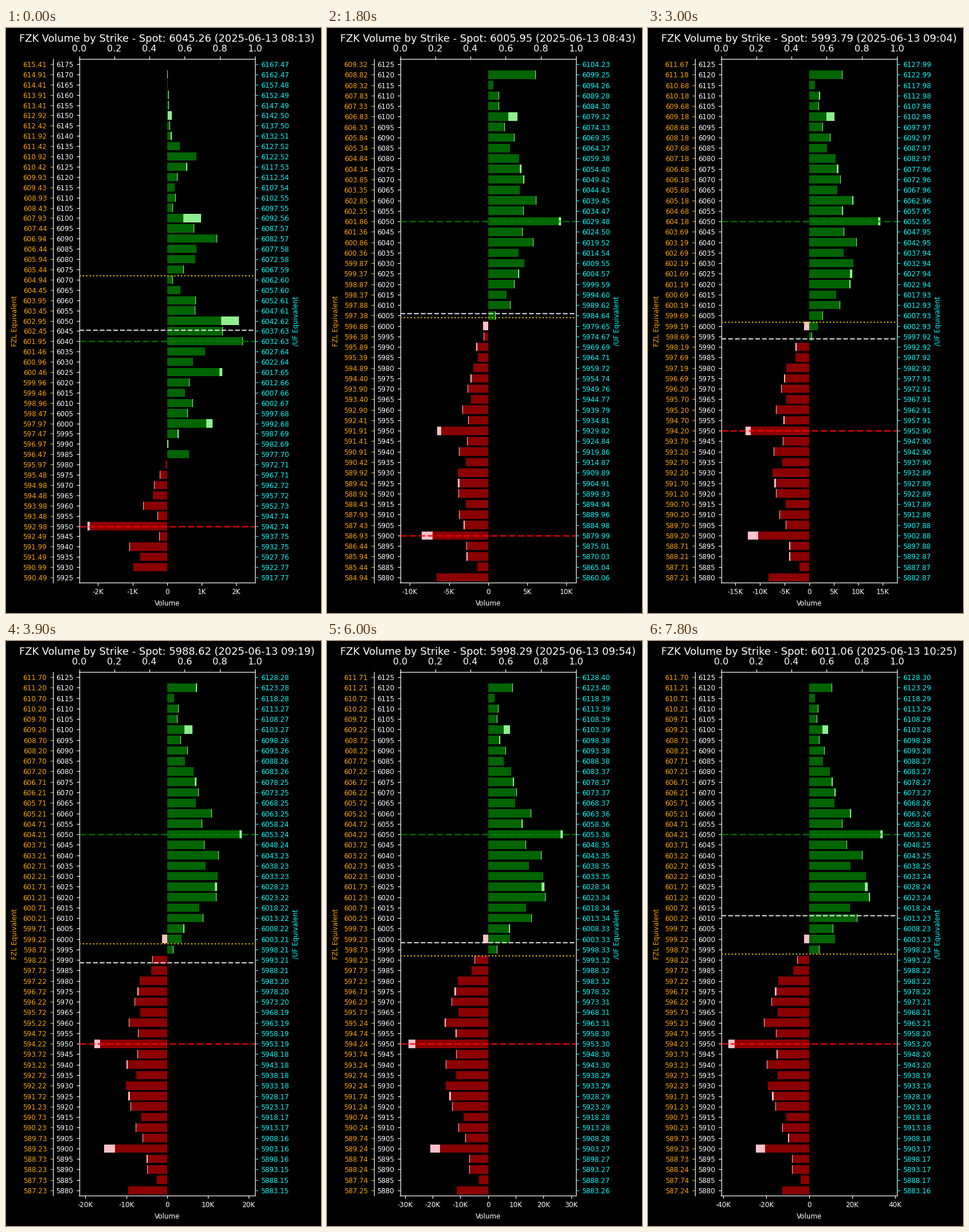
Animation of 549x1020 px, one loop 8 s. Source, as a matplotlib script:

```python
import numpy as np
import matplotlib.pyplot as plt
from matplotlib.animation import FuncAnimation
from matplotlib.ticker import FuncFormatter, MaxNLocator

W, H, DPI = 549, 1020, 96
LEFT, RIGHT, TOP, BOTTOM = 127.5, 434, 54, 967
FRAMES, INTERVAL, HOLD = 80, 100, 3
SMALL, MEDIUM, LARGE = 8.9, 12, 13.37
THICK, THIN = 2.225, 1.669

# Market state at a few steps; everything between is interpolated
STEPS = [0, 3, 6, 10, 16, 20, 26]
TOP_STRIKE = np.array([6175, 6175, 6125, 6125, 6125, 6125, 6125])
FUND_RATE = np.array([615.408, 611.84, 609.3173, 611.6745,
                      611.7229, 611.714, 611.7045]) / TOP_STRIKE
FUTURE_RATE = np.array([6167.468, 6129.98, 6104.2305, 6127.988,
                        6128.573, 6128.399, 6128.296]) / TOP_STRIKE
FLIP = [6071.8, 5994, 6004, 6001.95, 5993.3, 5992, 5992.8]
REACH = [2545, 2615, 11230, 17890, 25190, 31760, 40850]
SPOT_STEPS = [0, 3, 4, 6, 10, 16, 20, 26]
SPOT = [6045.26, 6045.26, 6003.4, 6005.95, 5993.79, 5983.45, 5998.29, 6011.06]
OPEN_STEP = 4
MONEY = 6000

EARLY = np.arange(6175, 5924, -5)
LATE = np.arange(6125, 5879, -5)

# Volume envelopes by strike, puts negative
PREMARKET = {
    5925: 0, 5930: -.97, 5940: -1.1, 5945: -.3, 5950: -1.25, 5955: -.38,
    5960: -.7, 5980: -.05, 5985: .85, 5990: .03, 6000: .85, 6020: .65,
    6025: 1.6, 6030: .75, 6040: 2.2, 6045: 2.15, 6050: 1.34, 6060: .84,
    6070: .17, 6090: 1.45, 6105: .23, 6120: .31, 6130: .85, 6140: .13, 6175: 0}
KNOTS = [5880, 5885, 5900, 5910, 5930, 5960, 5980, 5990, 5995, 6000,
         6010, 6020, 6040, 6060, 6070, 6090, 6115, 6120, 6125]
OPENING = [-6.6, -1.8, -4.6, -3.7, -3.9, -3.3, -1.9, -1.5, -.8, -.3,
           2.9, 3.4, 5.8, 6.2, 4.6, 3.4, .9, 6.1, 0]
MIDDLE = [-10.8, -3.9, -9.9, -9.5, -12.8, -12, -8.7, -4.6, 3.3, 3.4,
          11.5, 15.9, 15.6, 13.1, 9.2, 5.9, 2.8, 7.8, 0]
CLOSING = [-12.4, -5.3, -13.4, -12.5, -19, -21, -14.2, -5.5, 6.6, 7.7,
           22.4, 28.2, 24.8, 19.4, 12.2, 7.2, 3.7, 10.7, 0]


def envelope(step, strikes):
    if step < OPEN_STEP:
        curve = np.interp(strikes, list(PREMARKET), list(PREMARKET.values()))
        return 1000 * curve * (1 + .009 * step)
    start, mid, end = (1000 * np.interp(strikes, KNOTS, k)
                       for k in (OPENING, MIDDLE, CLOSING))
    if step < 6:
        return start * np.interp(step, [3, 6], [.1, 1])
    if step < 16:
        return start + (mid - start) * (step - 6) / 10
    return mid + (end - mid) * (step - 16) / 10


def market(step):
    """Strikes with their signed bar bodies and signed bar tips."""
    early = step < OPEN_STEP
    strikes = EARLY if early else LATE
    total = envelope(step, strikes)
    reach = np.interp(step, STEPS, REACH)

    # Round strikes draw more volume, odd fives less
    total *= np.where(strikes % 10 == 5, .75, 1) / np.where(strikes % 25 == 0, .75, 1) \
        ** (strikes % 10 == 5)
    total *= np.where(strikes % 50 == 0, np.where(total > 0, 1.55, 1.85), 1)

    # Tips: a share of the round strikes, a thin sliver elsewhere
    if early:
        share = np.interp(strikes, [5950, 6050, 6150], [.03, .25, .8])
    else:
        share = np.interp(strikes, [5900, 5950, 6050, 6100], [.17, .08, .03, .3])
    share = np.where(strikes % 50 == 0, share, .05 * (strikes % 25 == 0))
    bare = np.isin(strikes % 50, (15, 30, 35))
    sliver = np.minimum(.008 * reach * ~bare, abs(total))
    tips = np.sign(total) * np.maximum(share * abs(total), sliver)
    body = total - tips

    if not early:
        at_money = strikes == MONEY
        tips[at_money] = -.055 * reach
        body[at_money] = np.maximum(total[at_money], 0)
    return strikes, body, tips, reach


def thousands(v, _):
    return f"{v / 1000:g}K" if abs(v) > 1e-6 else "0"


plt.style.use("dark_background")
plt.rcParams.update({
    "font.family": "DejaVu Sans", "axes.linewidth": .9,
    "xtick.major.width": .9, "ytick.major.width": .9,
    "xtick.major.size": 3.9, "ytick.major.size": 3.9,
    "xtick.major.pad": 3.9, "ytick.major.pad": 3.9})

fig = plt.figure(figsize=(W / DPI, H / DPI), dpi=DPI, facecolor="black")
ax = fig.add_axes([LEFT / W, 1 - BOTTOM / H, (RIGHT - LEFT) / W, (BOTTOM - TOP) / H])
ax.set_facecolor("black")
ax.tick_params(labelsize=SMALL)
ax.xaxis.set_major_locator(MaxNLocator(8, steps=[1, 2, 2.5, 5, 10]))
ax.xaxis.set_major_formatter(FuncFormatter(thousands))

fund, future, scale = ax.twinx(), ax.twinx(), ax.twiny()
for twin in (fund, future, scale):
    twin.spines[:].set_visible(False)
fund.spines["left"].set_visible(True)
fund.spines["left"].set_position(("outward", 34.4))
fund.yaxis.set_ticks_position("left")
fund.tick_params(axis="y", colors="orange", labelsize=SMALL)
future.tick_params(axis="y", colors="cyan", labelsize=SMALL)
scale.set_xlim(0, 1)
scale.tick_params(axis="x", labelsize=MEDIUM)


def label(x, y, text, size, **style):
    return fig.text(x / W, 1 - y / H, text, fontsize=size, ha="center", **style)


MID = (LEFT + RIGHT) / 2
title = label(MID, 24, "", LARGE, va="baseline")
label(MID, 1007, "Volume", SMALL, va="baseline")
label(15.8, 511, "FZL Equivalent", SMALL, va="center", rotation=90, color="orange")
label(505.3, 511, "/UF Equivalent", SMALL, va="center", rotation=90, color="cyan")


def level(color, style, width, alpha):
    return ax.axhline(MONEY, color=color, ls=style, lw=width, alpha=alpha, zorder=3)


call_line = level("green", "--", THICK, .7)
put_line = level("red", "--", THICK, .75)
spot_line = level("white", "--", THIN, .8)
flip_line = level("gold", ":", THIN, .85)

shown = {"step": None, "bars": []}


def add_bars(strikes, width, left, color):
    shown["bars"].append(ax.barh(strikes, width, 4, left, color=color, zorder=2))


def show_step(step):
    strikes, body, tips, reach = market(step)
    calls, puts = np.maximum(body, 0), np.minimum(body, 0)
    call_tips, put_tips = np.maximum(tips, 0), np.minimum(tips, 0)

    for bars in shown["bars"]:
        bars.remove()
    shown["bars"] = []
    add_bars(strikes, calls, 0, "darkgreen")
    add_bars(strikes, puts, 0, "darkred")
    add_bars(strikes, call_tips, calls, "lightgreen")
    add_bars(strikes, put_tips, puts, "pink")
    ax.set_xlim(-reach, reach)

    fund_rate = np.interp(step, STEPS, FUND_RATE)
    future_rate = np.interp(step, STEPS, FUTURE_RATE)
    ax.set_yticks(strikes, [str(k) for k in strikes])
    fund.set_yticks(strikes, [f"{k * fund_rate:.2f}" for k in strikes])
    future.set_yticks(strikes, [f"{k * future_rate:.2f}" for k in strikes])
    for a in (ax, fund, future):
        a.set_ylim(strikes[-1] - 2.5, strikes[0] + 2.5)

    spot = np.interp(step, SPOT_STEPS, SPOT)
    levels = (strikes[(calls + call_tips).argmax()],
              strikes[(puts + put_tips).argmin()],
              spot, np.interp(step, STEPS, FLIP))
    for line, y in zip((call_line, put_line, spot_line, flip_line), levels):
        line.set_ydata([y, y])

    minute = 8 * 60 + 13 + int(step * 132 / 26 + .3)
    clock = f"{minute // 60:02d}:{minute % 60:02d}"
    title.set_text(f"FZK Volume by Strike - Spot: {spot:.2f} (2025-06-13 {clock})")


def update(frame):
    step = frame // HOLD
    if step != shown["step"]:
        show_step(step)
        shown["step"] = step
    return []


anim = FuncAnimation(fig, update, frames=FRAMES, interval=INTERVAL,
                     repeat=True, repeat_delay=0, blit=False)
plt.show()
```
